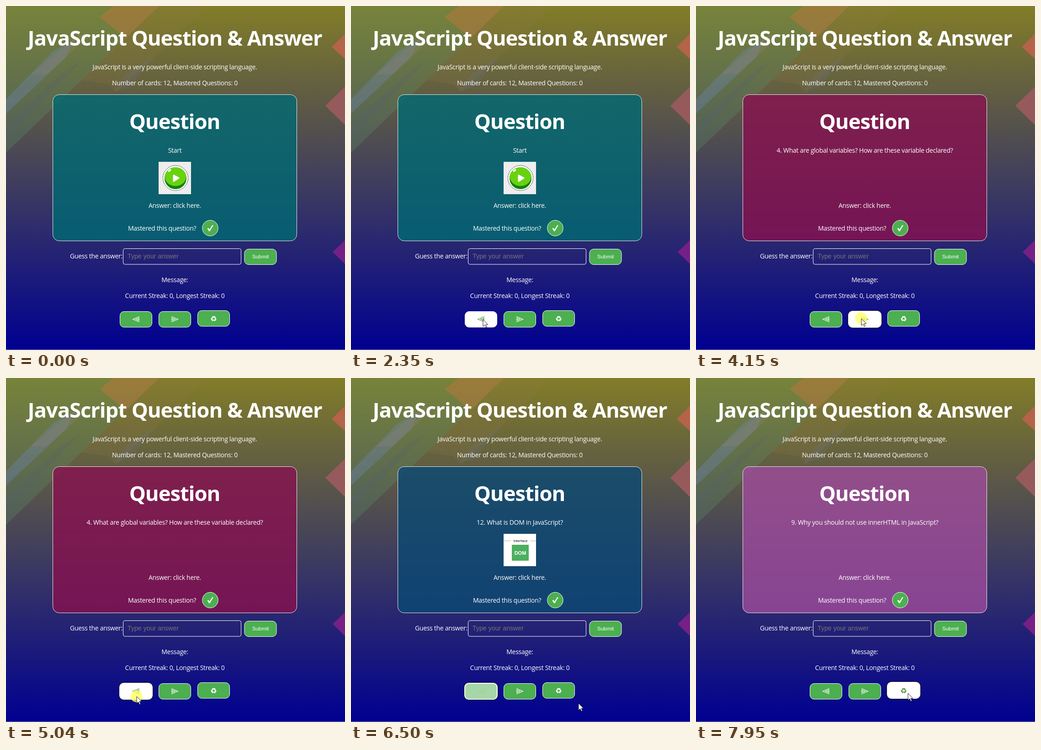
An HTML page for the animation above (8 s loop, 742 by 755 pixels).

```html
<!DOCTYPE html>
<html lang="en">
<head>
<meta charset="utf-8">
<title>JavaScript Question &amp; Answer</title>
<style>
  html, body { margin: 0; width: 100%; height: 100%; overflow: hidden; background: #00008f; }
  svg { display: block; }
  text { font: 500 14px "Open Sans", "Noto Sans", sans-serif; letter-spacing: -.3px; fill: #fff; }
  .mid { text-anchor: middle; }
  .title { font-weight: 700; font-size: 45.5px; letter-spacing: -1.1px; }
  .arial { font-family: "Liberation Sans", Arial, sans-serif; font-weight: 400; letter-spacing: 0; }
  .symbol { font-family: "DejaVu Sans", sans-serif; letter-spacing: 0; }
  .key { fill: #4caf50; stroke: #fff; }
  .glyph path { fill: none; stroke-width: 1.1; }
</style>
</head>
<body>
<svg width="742" height="755" viewBox="0 0 742 755">
  <defs>
    <linearGradient id="sky" x2="0" y2="1">
      <stop stop-color="#827d28"/><stop offset="1" stop-color="#000091"/>
    </linearGradient>
    <pattern id="checker" width="4" height="4" patternUnits="userSpaceOnUse">
      <path d="M0 0h4v4h-4z" fill="#fff"/><path d="M0 0h2v2h-2zM2 2h2v2h-2z" fill="#dcdcdc"/>
    </pattern>
  </defs>

  <rect width="742" height="755" fill="url(#sky)"/>
  <path d="M0 0H335L0 322Z" fill="#5c9468" opacity=".28"/>
  <path d="M335 0H442L240 190L225 172L165 163Z" fill="#8a7a48" opacity=".2"/>
  <path d="M236 0H335L262 71L205 24Z" fill="#c8743c" opacity=".42"/>
  <path d="M0 205L102 100L150 72L132 112L0 236Z" fill="#6c86b4" opacity=".36"/>
  <path d="M55 150L160 62L182 66L90 150Z" fill="#a08074" opacity=".22"/>
  <path d="M0 262L120 150L165 120L0 290Z" fill="#50606c" opacity=".25"/>
  <path d="M238 186L262 150L330 106L270 178Z" fill="#6c7490" opacity=".2"/>
  <path d="M713 90L742 61V116Z" fill="#b46448"/>
  <path d="M699 219L742 177V261Z" fill="#975a5c"/>
  <path d="M715 540L742 514V566Z" fill="#752087"/>
  <path d="M0 754.5H742" stroke="#787c98"/>

  <text class="mid title" x="369.5" y="87">JavaScript Question &amp; Answer</text>
  <text class="mid" x="369.5" y="139">JavaScript is a very powerful client-side scripting language.</text>
  <text class="mid" x="369.5" y="174">Number of cards: 12, Mastered Questions: 0</text>

  <rect id="card" x="102.5" y="194.5" width="534" height="321" rx="14" fill-opacity=".8" stroke="#e6ece6"/>
  <text class="mid title" x="369" y="270">Question</text>
  <text class="mid" id="question" x="369.5" y="322"></text>

  <g id="play">
    <rect x="334" y="342" width="71" height="71" fill="url(#checker)"/>
    <circle cx="371" cy="377.5" r="27.5" fill="#fff" stroke="#333" stroke-dasharray="3 1"/>
    <circle cx="371" cy="378" r="24" fill="#128212"/>
    <ellipse cx="371" cy="374.5" rx="23.5" ry="20.5" fill="#68d210"/>
    <path d="M367 371.5L378 377.5L367 384.5Z" fill="#fff" stroke="#fff" stroke-width="3" stroke-linejoin="round"/>
    <ellipse cx="358" cy="361" rx="4" ry="2" fill="#fff" transform="rotate(-35 358 361)"/>
  </g>
  <g id="dom">
    <rect x="334" y="342" width="71" height="71" fill="#fff"/>
    <path d="M334 357.5H350M392 357.5H405" stroke="#b4b4b4"/>
    <text class="mid arial" x="371" y="360" style="font-size:8px;fill:#111">Interface</text>
    <rect x="352" y="366" width="37" height="35" fill="#4caf60"/>
    <text class="mid arial" x="370.5" y="388" style="font-size:11px;font-weight:700">DOM</text>
  </g>

  <text class="mid" x="369.5" y="443">Answer: click here.</text>
  <text x="267" y="493">Mastered this question?</text>
  <circle class="key" cx="447" cy="487.5" r="17.2"/>
  <path d="M440.5 488.5L443 487L445.5 490.5L451.5 481H454L446 494.5H444.5Z" fill="#fff"/>

  <text x="140" y="554">Guess the answer:</text>
  <rect x="256.5" y="532.5" width="258" height="34.5" rx="4" fill="none" stroke="#fff"/>
  <text class="arial" x="266" y="554" style="font-size:14.2px;fill:#757575">Type your answer</text>
  <rect class="key" x="522" y="533.5" width="70" height="34" rx="9"/>
  <text class="mid arial" x="557" y="554" style="font-size:11.8px">Submit</text>
  <text class="mid" x="369.5" y="606">Message:</text>
  <text class="mid" x="369.5" y="641">Current Streak: 0, Longest Streak: 0</text>

  <g id="buttons"></g>
  <circle id="press" r="13" fill="#ffff64" opacity=".8"/>
  <path id="cursor" d="M0 0V15.2L3.6 11.9L6.2 17.6L8.6 16.5L6 11H10.7Z" fill="#fff" stroke="#111" stroke-width=".9"/>
</svg>
<script>
const LOOP = 8000, FADE = 400;
const GREEN = [76, 175, 80], WHITE = [255, 255, 255], INK = [84, 152, 72];
const $ = id => document.getElementById(id);

const cards = {
  0: ['Start', 'rgb(0,105,114)'],
  1: ['1. What is JavaScript?', 'rgb(70,62,104)'],
  2: ['2. What are JavaScript Data Types?', 'rgb(35,42,94)'],
  3: ['3. What is the use of isNaN function?', 'rgb(84,58,80)'],
  4: ['4. What are global variables? How are these variable declared?', 'rgb(136,17,79)'],
  5: ["5. What is 'this' keyword in JavaScript?", 'rgb(52,72,92)'],
  9: ['9. Why you should not use innerHTML in JavaScript?', 'rgb(159,75,156)'],
  12: ['12. What is DOM in JavaScript?', 'rgb(11,73,115)']
};

// Button position, times the pointer is over it, and its symbol.
const chevrons = side => `<g class="glyph" transform="scale(${side} 1)">
  <path d="M7.5 -6L-7 0L7.5 6M7.5 -3.4L-1 0L7.5 3.4M7.5 -.9L4 0L7.5 .9"/></g>`;
const buttons = [
  { x: 249, y: 670, hovers: [[1550, 2500], [4480, 6385]], symbol: chevrons(1) },
  { x: 334, y: 670, hovers: [[2570, 4400]], symbol: chevrons(-1) },
  { x: 419, y: 668, hovers: [[6720, 9000]],
    symbol: '<text class="mid symbol" y="6" style="font-size:16px;fill:inherit">♻</text>' }
];

// Press time, release time, button, card shown on release.
const clicks = [
  [2750, 2820, 1, 1], [3080, 3150, 1, 2], [3440, 3570, 1, 3], [3840, 3900, 1, 4], [4150, 4220, 1, 5],
  [4770, 4840, 0, 4], [5040, 5110, 0, 3], [5310, 5380, 0, 2], [5630, 5700, 0, 1], [5900, 6020, 0, 0],
  [6360, 6415, 0, 12],
  [6990, 7060, 2, 3], [7200, 7270, 2, 2], [7330, 7390, 2, 5], [7530, 7600, 2, 4], [7750, 7820, 2, 12],
  [7880, 7950, 2, 9]
];

// Pointer stops: time, x, y.
const path = [
  [1050, 488, 610], [1290, 427, 658], [1580, 342, 703], [1810, 289, 688],
  [2400, 289, 688], [2720, 362, 686],
  [4250, 362, 686], [4640, 286, 699],
  [6370, 286, 699], [6490, 498, 714],
  [6560, 498, 714], [6880, 464, 692], [LOOP, 464, 692]
];

for (const b of buttons) {
  $('buttons').insertAdjacentHTML('beforeend', `<g transform="translate(${b.x} ${b.y})">
    <rect x="-1.5" y="-1.5" width="74" height="38" rx="10.5" fill="#fff" stroke="#101010"/>
    <rect x=".5" y=".5" width="70" height="34.5" rx="9" stroke="#fff"/>
    <g transform="translate(35.5 17.5)" stroke-width=".3">${b.symbol}</g></g>`);
  [b.ring, b.face, b.icon] = $('buttons').lastElementChild.children;
}

const ease = p => 1 - (1 - Math.min(1, Math.max(0, p))) ** 2;
const mix = (a, b, p) => `rgb(${a.map((v, i) => Math.round(v + (b[i] - v) * p))})`;
const show = (el, on) => el.setAttribute('visibility', on ? 'visible' : 'hidden');

function pointerAt(t) {
  const i = Math.max(1, path.findIndex(stop => stop[0] > t));
  const [t0, x0, y0] = path[i - 1], [t1, x1, y1] = path[i];
  const p = (t - t0) / (t1 - t0);
  return [x0 + (x1 - x0) * p, y0 + (y1 - y0) * p];
}

function draw(t) {
  const pressed = clicks.filter(c => c[0] <= t).at(-1);
  const released = clicks.filter(c => c[1] <= t).at(-1);
  const current = released ? released[3] : 0;
  const [label, color] = cards[current];
  $('question').textContent = label;
  $('card').setAttribute('fill', color);
  show($('play'), current === 0);
  show($('dom'), current === 12);

  buttons.forEach((b, i) => {
    const glow = b.hovers.reduce((sum, [on, off]) =>
      sum + ease((t - on) / FADE) - ease((t - off) / FADE), 0);
    const ink = mix(WHITE, INK, glow);
    b.face.setAttribute('fill', mix(GREEN, WHITE, glow));
    b.icon.setAttribute('fill', ink);
    b.icon.setAttribute('stroke', ink);
    show(b.ring, pressed && pressed[2] === i);
  });

  const [x, y] = pointerAt(t);
  $('cursor').setAttribute('transform', `translate(${x} ${y})`);
  $('press').setAttribute('transform', `translate(${x - 0.5} ${y - 0.5})`);
  show($('cursor'), t >= path[0][0]);
  show($('press'), pressed && t < pressed[1]);
}

const start = performance.now();
function tick() {
  draw((performance.now() - start) % LOOP);
  requestAnimationFrame(tick);
}
tick();
</script>
</body>
</html>
```
